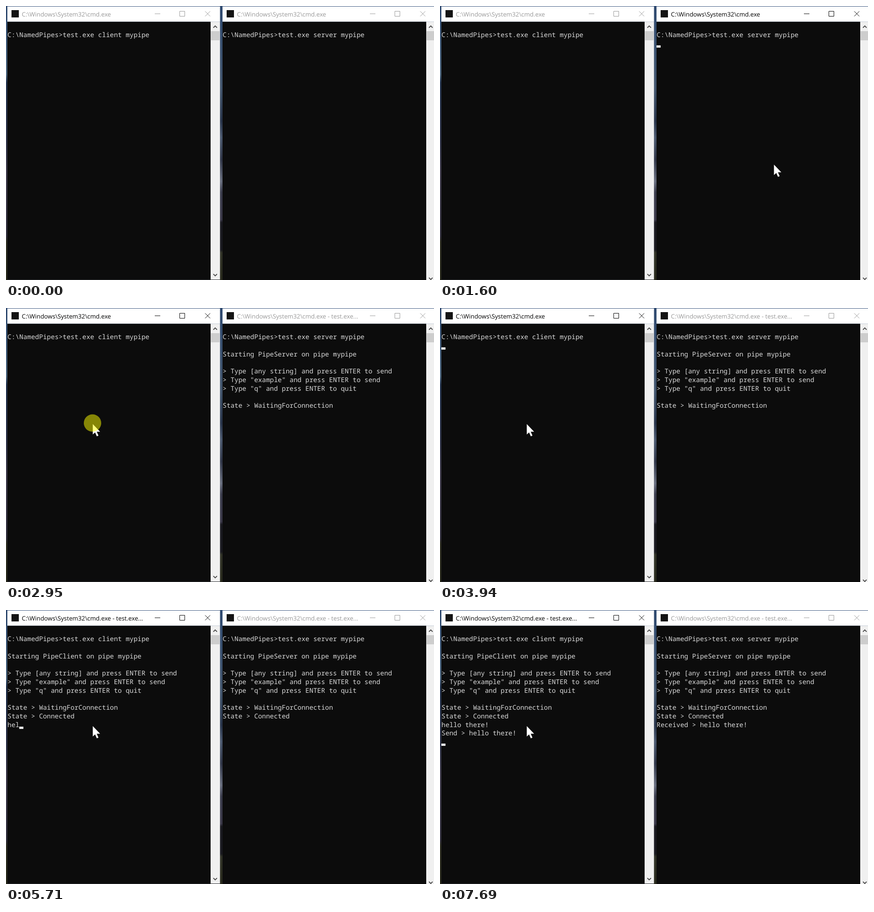
Write an HTML page that moves like this. It is 935 px wide and 599 px high and loops after 8000 ms.

```html
<!DOCTYPE html>
<html lang="en">
<head>
<meta charset="utf-8">
<title>Named pipes in two consoles</title>
<style>
  html, body { margin: 0; width: 100%; height: 100%; overflow: hidden; background: #0c0c0c; }
  svg { display: block; }
  text { white-space: pre; text-rendering: geometricPrecision; }
  .console { font: 500 14.35px "Noto Sans Mono", "DejaVu Sans Mono", monospace; fill: #dadada; }
  .title { font: 13.3px "Open Sans", "Noto Sans", sans-serif; }
</style>
</head>
<body>
<svg id="stage" width="935" height="599" viewBox="0 0 935 599">
  <defs>
    <linearGradient id="sky" x2="0" y2="1">
      <stop offset="0" stop-color="#2f4a70"/>
      <stop offset=".25" stop-color="#4f6880"/>
      <stop offset=".28" stop-color="#263650"/>
      <stop offset=".5" stop-color="#32364a"/>
      <stop offset=".6" stop-color="#423e4e"/>
      <stop offset=".84" stop-color="#343240"/>
      <stop offset=".86" stop-color="#303024"/>
      <stop offset="1" stop-color="#28291c"/>
    </linearGradient>
    <linearGradient id="gap" x2="0" y2="1">
      <stop offset="0" stop-color="#2f4a70"/>
      <stop offset=".3" stop-color="#43566e"/>
      <stop offset=".42" stop-color="#28344a"/>
      <stop offset=".48" stop-color="#4c5a70"/>
      <stop offset=".56" stop-color="#303648"/>
      <stop offset=".64" stop-color="#686e7e"/>
      <stop offset=".68" stop-color="#3a3c4c"/>
      <stop offset=".78" stop-color="#3a3848"/>
      <stop offset=".79" stop-color="#1a1a20"/>
      <stop offset=".89" stop-color="#1a1a20"/>
      <stop offset=".9" stop-color="#323428"/>
      <stop offset="1" stop-color="#28291c"/>
    </linearGradient>
  </defs>
  <rect width="935" height="599" fill="#34507a"/>
  <rect width="3" height="599" fill="url(#sky)"/>
  <rect x="467" width="6" height="599" fill="url(#gap)"/>
  <rect x="3" y="598" width="465" height="1" fill="#2a2c30"/>
</svg>
<script>
const LOOP = 8000, CELL = 8.61, ROW = 18.75, TOP = 35;
const stage = document.getElementById('stage');

function add(parent, tag, attrs, content = '') {
  const node = document.createElementNS('http://www.w3.org/2000/svg', tag);
  for (const key in attrs) node.setAttribute(key, attrs[key]);
  node.textContent = content;
  parent.append(node);
  return node;
}

function makeWindow(x, bodyWidth, bottom) {
  const g = add(stage, 'g', { transform: `translate(${x} 0)` });
  const rect = (x, y, width, height, fill) => add(g, 'rect', { x, y, width, height, fill });
  const chevron = (y, dir) => add(g, 'path', {
    d: `M${bodyWidth + 6} ${y + 2 * dir}l4 ${-4 * dir}l4 ${4 * dir}`,
    fill: 'none', stroke: '#484848', 'stroke-width': 1.8
  });
  rect(0, 1, bodyWidth + 20.5, 33.5, '#fff');
  rect(0, 34.5, bodyWidth, bottom - 34.5, '#0c0c0c');
  rect(bodyWidth, 34.5, 20.5, bottom - 34.5, '#f0f0f0');
  rect(bodyWidth + 0.5, 55, 19, 20, '#cdcdcd');
  chevron(45.5, 1);
  chevron(bottom - 10, -1);
  rect(9, 9, 16, 16, '#141414');
  const title = add(g, 'text', { x: 31.5, y: 23, class: 'title' });
  const buttons = add(g, 'path', {
    d: 'M322 17H334M376.5 11.5h11v11h-11zM432 11.5l11 11m0-11l-11 11', fill: 'none', 'stroke-width': 1
  });
  const rows = Array.from({ length: 14 }, (_, n) =>
    add(g, 'text', { x: 0.3, y: Math.round(TOP + ROW * (n + 1) - 4.4), class: 'console' }));
  const caret = rect(0, 0, 9, 5, '#f2f2f2');
  return { title, buttons, rows, caret };
}

const client = makeWindow(3, 444, 598);
const server = makeWindow(473, 445, 606);
const pointer = add(stage, 'path', {
  d: 'M.6 .8V23.6L5.6 19L9.4 27.4L13 25.9L9.2 17.6H16.6Z', fill: '#fff'
});
const click = add(stage, 'circle', { r: 19, fill: '#ff0', 'fill-opacity': 0.5 });

// Pointer tip: time, x, y
const pointerSteps = [
  [70, 849, 564], [140, 802, 470], [210, 762, 396], [290, 738, 358], [360, 729, 346],
  [2320, 503, 376], [2390, 340, 390], [2460, 238, 356], [2540, 188, 304],
  [2620, 175, 268], [2700, 181, 256], [2780, 189, 253]
];

// Console caret: time, window, column, row (a lone time hides it)
const caretSteps = [
  [0], [770, server, 36, 1], [1230], [1600, server, 0, 2], [1680, server, 0, 10], [2320],
  [3010, client, 36, 1], [3490], [3940, client, 0, 2], [4000, client, 0, 11], [5090],
  [5410, client, 1, 11], [5550], [5710, client, 3, 11], [5880, client, 4, 11],
  [6020, client, 5, 11], [6110], [6340, client, 7, 11], [6570, client, 8, 11], [6690],
  [6810, client, 9, 11], [6980, client, 10, 11], [7050, client, 11, 11], [7190],
  [7290, client, 12, 11], [7690, client, 0, 13]
];

const message = 'hello there!';
const keyTimes = [5410, 5550, 5710, 5880, 6020, 6110, 6340, 6570, 6810, 6980, 7050, 7290];

const latest = (steps, t) => steps.filter(step => step[0] <= t).pop();
const show = (node, on) => node.setAttribute('visibility', on ? 'visible' : 'hidden');

function drawWindow(win, role, t, active, started, lastRows) {
  win.title.textContent = 'C:\\Windows\\System32\\cmd.exe' + (t >= started ? ' - test.exe...' : '');
  win.title.setAttribute('fill', active ? '#000' : '#999');
  win.buttons.setAttribute('stroke', active ? '#000' : '#999');
  const lines = ['', `C:\\NamedPipes>test.exe ${role.toLowerCase()} mypipe`];
  if (t >= started) lines.push(
    '', `Starting Pipe${role} on pipe mypipe`, '',
    '> Type [any string] and press ENTER to send',
    '> Type "example" and press ENTER to send',
    '> Type "q" and press ENTER to quit', '',
    'State > WaitingForConnection');
  if (t >= 4000) lines.push('State > Connected', ...lastRows);
  win.rows.forEach((row, n) => { row.textContent = lines[n] || ''; });
}

function draw(t) {
  const typed = message.slice(0, keyTimes.filter(k => k <= t).length);
  const sent = t >= 7690;
  drawWindow(client, 'Client', t, t >= 2950, 4000, [typed, sent ? `Send > ${message}` : '']);
  drawWindow(server, 'Server', t, t >= 710 && t < 2950, 1680, [sent ? `Received > ${message}` : '']);

  const [, owner, col, row] = latest(caretSteps, t);
  for (const win of [client, server]) show(win.caret, win === owner);
  if (owner) {
    owner.caret.setAttribute('x', Math.round(col * CELL));
    owner.caret.setAttribute('y', Math.floor(TOP + ROW * (row + 1)) - 5);
  }

  const tip = latest(pointerSteps, t);
  show(pointer, tip);
  show(click, (t >= 710 && t < 830) || (t >= 2950 && t < 3010));
  if (tip) {
    pointer.setAttribute('transform', `translate(${tip[1]} ${tip[2]})`);
    click.setAttribute('cx', tip[1]);
    click.setAttribute('cy', tip[2] - 1.5);
  }
}

const start = performance.now();
function tick() {
  draw((performance.now() - start) % LOOP);
  requestAnimationFrame(tick);
}
tick();
</script>
</body>
</html>
```
